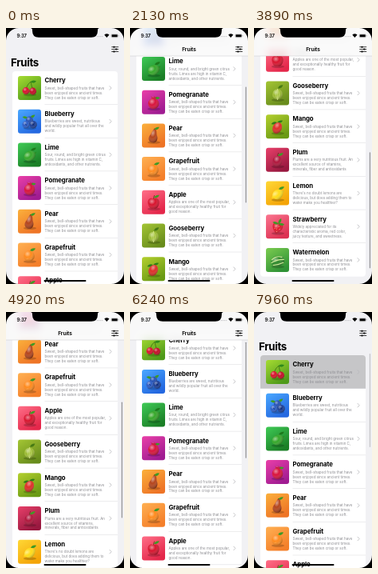
An HTML page that plays this animation: 148x320 px, repeating every 8 s.

```html
<!DOCTYPE html>
<html lang="en">
<head>
<meta charset="utf-8">
<title>Fruits</title>
<style>
  html, body { margin: 0; width: 100%; height: 100%; overflow: hidden; background: #000; }
  svg { display: block; width: 100%; height: 100%; }
  text { font-family: Inter, "Open Sans", sans-serif; fill: #000; }
  .large { font-size: 13.3px; font-weight: 700; letter-spacing: -.35px; }
  .inline { font-size: 6.7px; font-weight: 600; letter-spacing: -.1px; text-anchor: middle; }
  .clock { font-size: 5.9px; font-weight: 600; letter-spacing: -.1px; }
  .name { font-size: 7.8px; font-weight: 700; letter-spacing: -.05px; }
  .note { font-size: 4.55px; fill: #8e8e93; }
  .line { fill: none; stroke-linecap: round; stroke-linejoin: round; }
</style>
</head>
<body>
<svg viewBox="0 0 148 320">
  <defs>
    <radialGradient id="gloss" cx=".35" cy=".3" r=".8">
      <stop offset="0" stop-color="#fff" stop-opacity=".5"/>
      <stop offset=".4" stop-color="#fff" stop-opacity="0"/>
      <stop offset="1" stop-color="#000" stop-opacity=".4"/>
    </radialGradient>
    <filter id="blur" x="-10%" y="-10%" width="120%" height="120%"><feGaussianBlur stdDeviation="5"/></filter>
    <clipPath id="barClip"><rect width="148" height="35"/></clipPath>
    <clipPath id="belowBar"><rect y="33" width="148" height="287"/></clipPath>
  </defs>
  <rect width="148" height="320" fill="#f1f1f4"/>
  <g clip-path="url(#belowBar)"><text id="large" class="large" x="6">Fruits</text></g>
  <g id="list"></g>

  <g id="bar">
    <g clip-path="url(#barClip)">
      <rect width="148" height="35" fill="#f4f4f6"/>
      <use href="#list" filter="url(#blur)"/>
      <rect width="148" height="35" fill="#f9f9f9" opacity=".84"/>
    </g>
    <rect y="34.8" width="148" height=".4" fill="#b8b8bc"/>
    <text class="inline" x="74" y="28.5">Fruits</text>
  </g>
  <g class="line" stroke="#111" stroke-width=".8">
    <path d="M132.7 23.7H140.8M132.7 26.6H140.8M132.7 29.5H140.8"/>
    <path d="M135.2 23.7h.6M138 26.6h.6M135.2 29.5h.6" stroke-width="2"/>
  </g>

  <rect id="thumb" x="144.8" width="1.3" rx=".65" fill="#77777b"/>
  <rect x="47.5" y="315" width="53" height="2" rx="1"/>

  <text class="clock" x="13.5" y="12">9:37</text>
  <g fill="#b5b5b9">
    <circle cx="114.5" cy="10.6" r=".6"/><circle cx="116.6" cy="10.6" r=".6"/>
    <circle cx="118.7" cy="10.6" r=".6"/><circle cx="120.8" cy="10.6" r=".6"/>
  </g>
  <path d="M123.3 8.6Q126.4 5.9 129.5 8.6L126.4 12Z"/>
  <rect x="132" y="7.6" width="8.4" height="4.2" rx="1.1" fill="none" stroke="#888" stroke-width=".4"/>
  <rect x="132.6" y="8.2" width="7.2" height="3" rx=".6"/>
  <rect x="140.8" y="9" width=".6" height="1.4" rx=".3" fill="#888"/>

  <path fill-rule="evenodd" d="M0 0H148V320H0ZM16 0A16 16 0 0 0 0 16V304A16 16 0 0 0 16 320H132A16 16 0 0 0 148 304V16A16 16 0 0 0 132 0H117.5Q115 0 115 2.5V3.500Q115 11.800 107 11.800H41Q33 11.800 33 3.500V2.500Q33 0 30.500 0Z"/>
</svg>
<script>
const $ = id => document.getElementById(id);
const PITCH = 41.7, TOP = 54, LOOP = 8000;

// Fruit drawing, inside a 29 by 30 tile
const body = (d, c) => `<path d="${d}" fill="${c}"/><path d="${d}" fill="url(#gloss)"/>`;
const oval = (x, y, rx, ry = rx) =>
  `M${x - rx} ${y}a${rx} ${ry} 0 1 1 ${2 * rx} 0a${rx} ${ry} 0 1 1 ${-2 * rx} 0Z`;
const stroke = (d, c, w) => `<path class="line" d="${d}" stroke="${c}" stroke-width="${w}"/>`;
const leaf = (x, y, turn = 0, c = '#3f9a25') =>
  `<path d="M0 0Q2-4 7-3Q5 1.500 0 0Z" fill="${c}" transform="translate(${x} ${y}) rotate(${turn})"/>`;
const tilt = (a, s) => `<g transform="rotate(${a} 14.5 16)">${s}</g>`;
const stem = stroke('M14.5 11Q14.5 8 15.5 6.5', '#5b3a17', .8);
const pearShape = 'M14.5 7C17 7 17 11 18.500 14C21.500 19 19.500 24 14.500 24C9.500 24 7.500 19 10.500 14C12 11 12 7 14.500 7Z';
const heartShape = 'M14.500 24C10 21 7 16 8.500 12.500C10 9.500 19 9.500 20.500 12.500C22 16 19 21 14.500 24Z';

const art = {
  Cherry: stroke('M10 16Q12 10 16 7Q17 12 18.500 17', '#3d6b12', .8) + leaf(15.5, 7.5, 15, '#2f8a1c')
    + body(oval(10, 18.5, 4.4), '#d9122b') + body(oval(18.7, 19, 4.4), '#c40d26'),
  Blueberry: leaf(15, 11, -10) + leaf(13, 11, 215) + body(oval(14.5, 13.5, 4.6), '#2450b0')
    + body(oval(10, 19, 4.6), '#2b5cc4') + body(oval(19, 19, 4.8), '#1c3f96')
    + stroke('M18 18l2 1.500M20 17.700l-1.500 2M9.200 18.300l1.600 1.400', '#0b1f5c', .7),
  Lime: leaf(16, 10, -5, '#1c7a1c') + tilt(-25, body(oval(14.5, 16.5, 7.5, 6), '#36a82a'))
    + stroke('M21.500 13l1 -1', '#2b8c22', 1.2),
  Pomegranate: leaf(15, 10, 20) + body('M12.500 11L11.500 7.500L14 9L15 7L16 9L18 8L17 11Z', '#c4163a')
    + body(oval(14.5, 16.8, 6.8), '#d8143c'),
  Pear: leaf(15, 8, -5) + stem + tilt(12, body(pearShape, '#b5451c')),
  Grapefruit: leaf(15, 10, 0) + body(oval(14, 16.5, 6.8), '#ff8a1c')
    + stroke('M11 20l2 -1M16 20.500l1 -.8', '#ffb45c', .5),
  Apple: leaf(15, 9.5, -5) + stem
    + body('M14.500 11C18 8.500 22 11 21.500 16C21 21 18 24 14.500 22.800C11 24 8 21 7.500 16C7 11 11 8.500 14.500 11Z', '#d8142e'),
  Gooseberry: leaf(15, 9, -10, '#477a14') + body(oval(14.5, 16.5, 6.6), '#9cbc34')
    + stroke('M14.500 10Q10 16 14.500 23M14.500 10Q19 16 14.500 23M14.500 10V23', '#dcec94', .5),
  Mango: leaf(14, 10, 5, '#2f7d18') + leaf(14, 10, 190, '#2f7d18')
    + tilt(28, body(oval(14.5, 16.8, 5.6, 7.2), '#de2f28')),
  Plum: leaf(15, 10, -5) + stem + tilt(20, body(oval(14.5, 17, 6, 6.8), '#b0163c')),
  Lemon: leaf(16, 10, 0) + tilt(-30, body('M5.500 16.500Q8 15.500 9 13Q14 8 20 13Q21 15.500 23.500 16.500Q21 17.500 20 20Q14 25 9 20Q8 17.500 5.500 16.500Z', '#ffdc1a')),
  Strawberry: tilt(15, body(heartShape, '#e0142e')
    + stroke('M12 15v.3M16 14.500v.3M14 18v.3M17.500 17.500v.3M11.500 18v.3M14.800 21v.3', '#ffd98a', .7)
    + leaf(14.5, 11.5, 15) + leaf(14.5, 11.5, 205) + leaf(14.5, 11.5, -55)),
  Watermelon: tilt(-15, body(oval(14.5, 16.5, 8.6, 6.6), '#2f8a2c')
    + stroke('M8 13Q14.500 9 21 13M6.500 16.500Q14.500 14 22.500 16.500M8 20Q14.500 21 21 20', '#d4ee9c', 1.1))
};

const common = 'Sweet, bell-shaped fruits that have|been enjoyed since ancient times.|They can be eaten crisp or soft.';
const fruits = [
  ['Cherry', '#a6dc32', '#4f9a1a'],
  ['Blueberry', '#4aa8ff', '#2468e0', 'Blueberries are sweet, nutritious|and wildly popular fruit all over the|world.'],
  ['Lime', '#3fcb56', '#1b7f26', 'Sour, round, and bright green citrus|fruits. Limes are high in vitamin C,|antioxidants, and other nutrients.'],
  ['Pomegranate', '#ea3fa8', '#a01c92'],
  ['Pear', '#fbb03c', '#ee7426'],
  ['Grapefruit', '#ffb052', '#f47f2a'],
  ['Apple', '#ff6f88', '#e4274a', 'Apples are one of the most popular,|and exceptionally healthy fruit for|good reason.'],
  ['Gooseberry', '#a4c634', '#688c1c'],
  ['Mango', '#b4d02e', '#6a9a14'],
  ['Plum', '#e8406a', '#98183f', 'Plums are a very nutritious fruit. An|excellent source of vitamins,|minerals, fiber and antioxidants'],
  ['Lemon', '#ffd836', '#f4a406', "There's no doubt lemons are|delicious, but does adding them to|water make you healthier?"],
  ['Strawberry', '#fb7690', '#dc3152', 'Widely appreciated for its|characteristic aroma, red color,|juicy texture, and sweetness.'],
  ['Watermelon', '#7ccc50', '#2f9236']
];

function row([name, light, dark, note = common], i) {
  const lines = note.split('|').map((s, k) =>
    `<text class="note" x="48.5" y="${22.6 + 5.95 * k}">${s}</text>`).join('');
  const rule = i < fruits.length - 1
    ? `<rect x="48.5" y="${PITCH - .4}" width="91.5" height=".4" fill="#cfcfd3"/>` : '';
  return `<g transform="translate(0 ${TOP + i * PITCH})">
    <linearGradient id="g${i}" x1="0" y1="0" x2=".6" y2="1">
      <stop stop-color="${light}"/><stop offset="1" stop-color="${dark}"/></linearGradient>
    <rect x="15" y="6" width="29" height="30" rx="3" fill="url(#g${i})"/>
    <g transform="translate(15 6)"><ellipse cx="15" cy="23.5" rx="8" ry="1.8" opacity=".2"/>${art[name]}</g>
    <text class="name" x="48.5" y="14.3">${name}</text>${lines}${rule}
    ${stroke('M130 18.700L132.200 21L130 23.300', '#b8b8bc', .8)}</g>`;
}

$('list').innerHTML =
  `<rect x="8" y="${TOP}" width="132" height="${PITCH * fruits.length}" rx="4" fill="#fff"/>
   <path id="press" d="M8 95.700V58Q8 54 12 54H136Q140 54 140 58V95.700Z" fill="#c6c6c8"/>`
  + fruits.map(row).join('');

// The picture advances in runs of even steps: first, last, count
const runs = [[1010, 1790, 8], [1910, 2130, 3], [3000, 3790, 8], [3890, 4420, 6], [4560, 4560, 1],
  [4700, 5490, 8], [5600, 6240, 7], [6460, 7220, 8], [7320, 7320, 1], [7840, 7960, 2]];
const ticks = [0];
for (const [a, b, n] of runs)
  for (let i = 0; i < n; i++) ticks.push(a + (n > 1 ? i * (b - a) / (n - 1) : 0));
const hold = t => ticks.filter(x => x <= t + 7).pop();

const clamp = x => Math.max(0, Math.min(1, x));

// Steady drag for a share of the way, then exponential slowing
const flick = (x, from, to, drag, share, tau) => from + (to - from) *
  (x < drag ? share * x / drag : 1 - (1 - share) * Math.exp((drag - x) / tau));

function scrollAt(t) {
  if (t < 1000) return 0;
  if (t < 2990) return flick(t - 950, 0, 109.9, 200, .4, 300);
  if (t < 4690) return flick(t - 2950, 107.4, 295, 200, .4, 300);
  if (t < 6450) return flick(t - 4660, 295, 20.5, 260, .366, 451);
  if (t < 6690) return 29 - 53 * (1 - Math.cos(Math.PI * (t - 6410) / 280)) / 2;
  if (t < 7310) return -24 * Math.exp((6690 - t) / 193);
  return 0;
}

function draw(time) {
  const t = hold(time), s = scrollAt(t);
  $('list').setAttribute('transform', `translate(0 ${-s})`);
  $('large').setAttribute('y', 48.2 - s);
  $('bar').setAttribute('opacity', clamp((s - 14) / 6));
  $('press').setAttribute('opacity', t >= 7840 ? 1 : 0);
  const end = 169 + .46 * s, start = Math.max(end - 145, 36, 52 - Math.max(0, s));
  const thumb = $('thumb');
  thumb.setAttribute('y', start);
  thumb.setAttribute('height', end - start);
  thumb.setAttribute('opacity', t < 1000 ? 0 : t < 7840 ? .75 : .35);
}

const begin = performance.now();
function loop() {
  draw((performance.now() - begin) % LOOP);
  requestAnimationFrame(loop);
}
loop();
</script>
</body>
</html>
```
